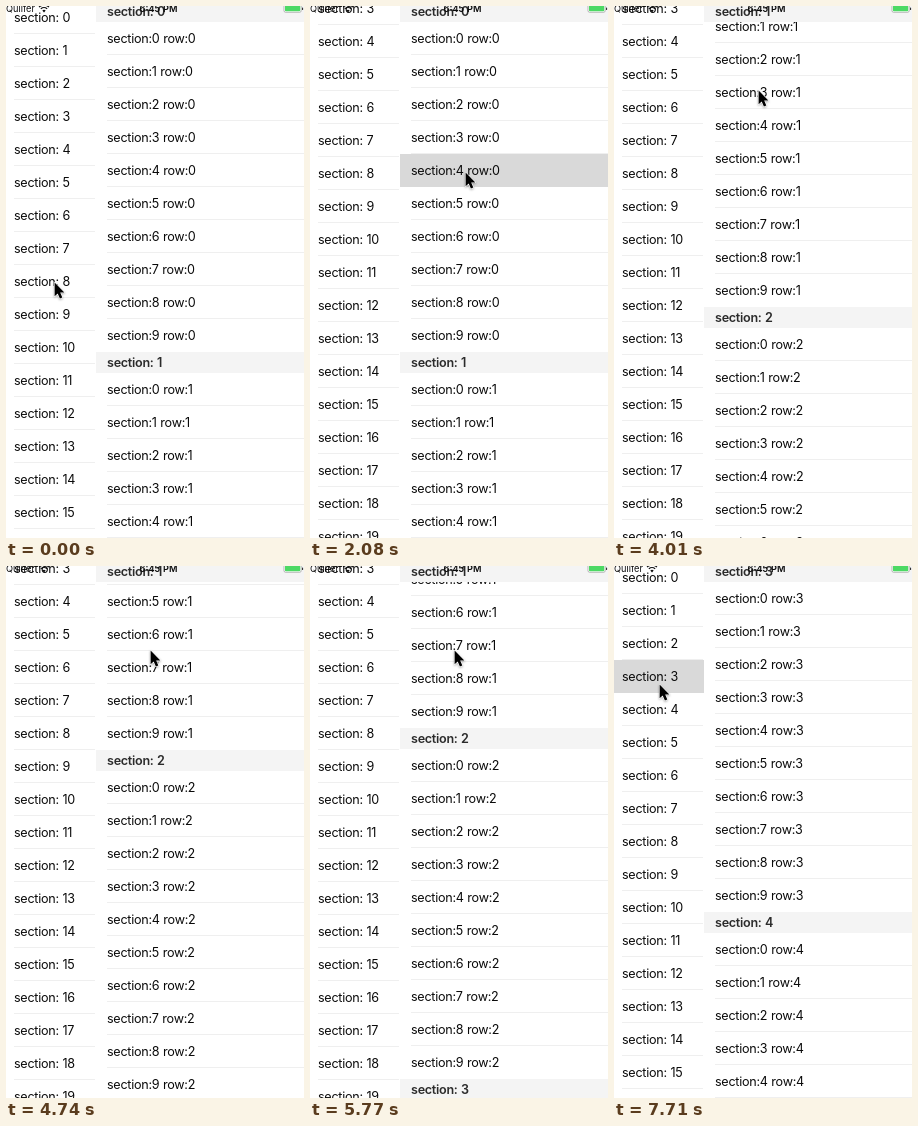
An HTML page for the animation above (8 s loop, 298 by 532 pixels).

```html
<!DOCTYPE html>
<html lang="en">
<head>
<meta charset="utf-8">
<title>Linked lists</title>
<style>
  html, body { margin: 0; width: 100%; height: 100%; overflow: hidden; background: #fff; }
  svg { display: block; width: 298px; height: 532px; }
  text { font: 12.6px Inter, "Liberation Sans", sans-serif; letter-spacing: -.28px; word-spacing: .5px; fill: #0a0a0a; white-space: pre; }
  .head { font-weight: 600; fill: #2b2b2b; }
  .status { font-size: 9.2px; letter-spacing: 0; }
  .time { font-weight: 600; text-anchor: middle; }
</style>
</head>
<body>
<svg id="stage" viewBox="0 0 298 532"></svg>
<script>
const LOOP = 8000, TICK = 148.25;
const ROW = 33, HEAD = 21, TOP = -5, ROWS = 10, SECTIONS = 5;
const SECTION = HEAD + ROWS * ROW;
const LEFT_W = 90, LEFT_ROWS = 20, VIEW = 552, CONTENT = LEFT_ROWS * ROW;
const GREY = '#d9d9d9', LINE = '#efefef';

const stage = document.getElementById('stage');

function add(parent, tag, attrs, label) {
  const el = document.createElementNS('http://www.w3.org/2000/svg', tag);
  for (const name in attrs) el.setAttribute(name, attrs[name]);
  if (label !== undefined) el.textContent = label;
  parent.appendChild(el);
  return el;
}

const rect = (parent, x, y, width, height, fill, rx = 0) =>
  add(parent, 'rect', { x, y, width, height, fill, rx });

const move = (el, x, y) => el.setAttribute('transform', `translate(${x} ${y})`);
const show = (el, opacity) => el.setAttribute('opacity', +opacity);

// Right list: grouped rows with sticky headers
const right = add(stage, 'g');
const rightLines = add(right, 'g');
const rightMark = rect(right, LEFT_W - 1, HEAD + 4 * ROW, 209, ROW, GREY);
const heads = [];
for (let s = 0; s < SECTIONS; s++) {
  for (let r = 0; r < ROWS; r++) {
    const y = s * SECTION + HEAD + r * ROW;
    if (r < ROWS - 1) rect(rightLines, 101, y + ROW - 1, 197, 1, LINE);
    add(right, 'text', { x: 101, y: y + 21 }, `section:${r} row:${s}`);
  }
}
for (let s = 0; s < SECTIONS; s++) {
  const head = add(right, 'g');
  rect(head, LEFT_W, 0, 208, HEAD, '#f4f4f4');
  add(head, 'text', { x: 101, y: 15, class: 'head' }, `section: ${s}`);
  heads.push(head);
}

// Left list: one row per section
rect(stage, 0, 0, LEFT_W, 532, '#fff');
const left = add(stage, 'g');
const leftLines = add(left, 'g');
const leftMark = rect(left, 0, 0, LEFT_W, ROW, GREY);
for (let s = 0; s < LEFT_ROWS; s++) {
  rect(leftLines, 8, s * ROW + ROW - 1, LEFT_W - 9, 1, LINE);
  add(left, 'text', { x: 8, y: s * ROW + 21 }, `section: ${s}`);
}
const bar = rect(stage, 85, 0, 2, VIEW * VIEW / CONTENT, '#7f7f7f', 1);

// Status bar
add(stage, 'text', { x: 0, y: 6, class: 'status' }, 'Quilfer');
const wifi = add(stage, 'g', { fill: 'none', stroke: '#111', 'stroke-width': 1.3 });
for (const r of [7, 4.5]) {
  const d = r * 0.7;
  add(wifi, 'path', { d: `M${38 - d} ${6 - d}A${r} ${r} 0 0 1 ${38 + d} ${6 - d}` });
}
add(wifi, 'path', { d: 'M38 6.5l-1.7-1.9a2.4 2.4 0 0 1 3.4 0z', fill: '#111', stroke: 'none' });
add(stage, 'text', { x: 152.5, y: 6, class: 'status time' }, '6:45 PM');
add(stage, 'rect', { x: 278, y: -1.5, width: 17.2, height: 7.8, rx: 1.6, fill: '#fff', stroke: '#777', 'stroke-width': .5 });
rect(stage, 279, -.5, 15.2, 5.8, '#4cd964', .8);
rect(stage, 296, 1.4, 1.1, 2.6, '#333', .5);

const cursor = add(stage, 'path', {
  d: 'M.6 .6V14.2L3.7 11.4 5.9 16.4 8.3 15.4 6.2 10.4H10.4Z',
  fill: '#000', stroke: '#fff', 'stroke-width': 1.2, 'paint-order': 'stroke', 'stroke-linejoin': 'round',
  style: 'filter: drop-shadow(0 1px 1px rgba(0,0,0,.3))'
});

// Eased progress from 0 to 1 between two ticks
function ease(k, from, to) {
  const u = Math.min(1, Math.max(0, (k - from) / (to - from)));
  return u * u * (3 - 2 * u);
}

// Pointer moves: from tick, to tick, dx, dy
const moves = [
  [0, 2, -4, 4],
  [3, 8, 21, -90],
  [8, 11, 90, -24],
  [19, 23, -11, -82],
  [44, 45, -26, 15],
  [45, 49, -73, 19]
];

function pointer(k) {
  let x = 48, y = 276;
  for (const [from, to, dx, dy] of moves) {
    const u = ease(k, from, to);
    x += dx * u;
    y += dy * u;
  }
  return [x, y];
}

// Drag, bounce back, then return to the top
const leftScroll = k =>
  111 * ease(k, 3, 8) - 3 * ease(k, 8, 10) - 108 * ease(k, 38, 41);

// Drag, decaying flick, then jump to the tapped section
const rightScroll = k =>
  90 * ease(k, 19, 23)
  + 448 * (1 - Math.exp(-0.35 * Math.max(0, k - 23.72)))
  + 515 * ease(k, 49, 52);

function draw(k) {
  const ls = Math.round(leftScroll(k));
  const rs = Math.round(rightScroll(k));
  move(left, 0, TOP - ls);
  move(right, 0, TOP - rs);
  heads.forEach((head, s) => {
    const y = s * SECTION;
    move(head, 0, Math.min(Math.max(y, rs), y + SECTION - HEAD));
  });
  show(rightMark, k >= 14 && k < 24);
  show(leftMark, k >= 38);
  leftMark.setAttribute('y', (k < 50 ? 1 : 3) * ROW);
  move(bar, 0, TOP + 2 + ls * VIEW / CONTENT);
  show(bar, k < 4 ? 0 : 1 - ease(k, 9, 11));
  move(cursor, ...pointer(k));
}

const start = performance.now();
function frame() {
  const t = (performance.now() - start) % LOOP;
  draw(Math.min(53, Math.floor((t + 10) / TICK)));
  requestAnimationFrame(frame);
}
frame();
</script>
</body>
</html>
```
